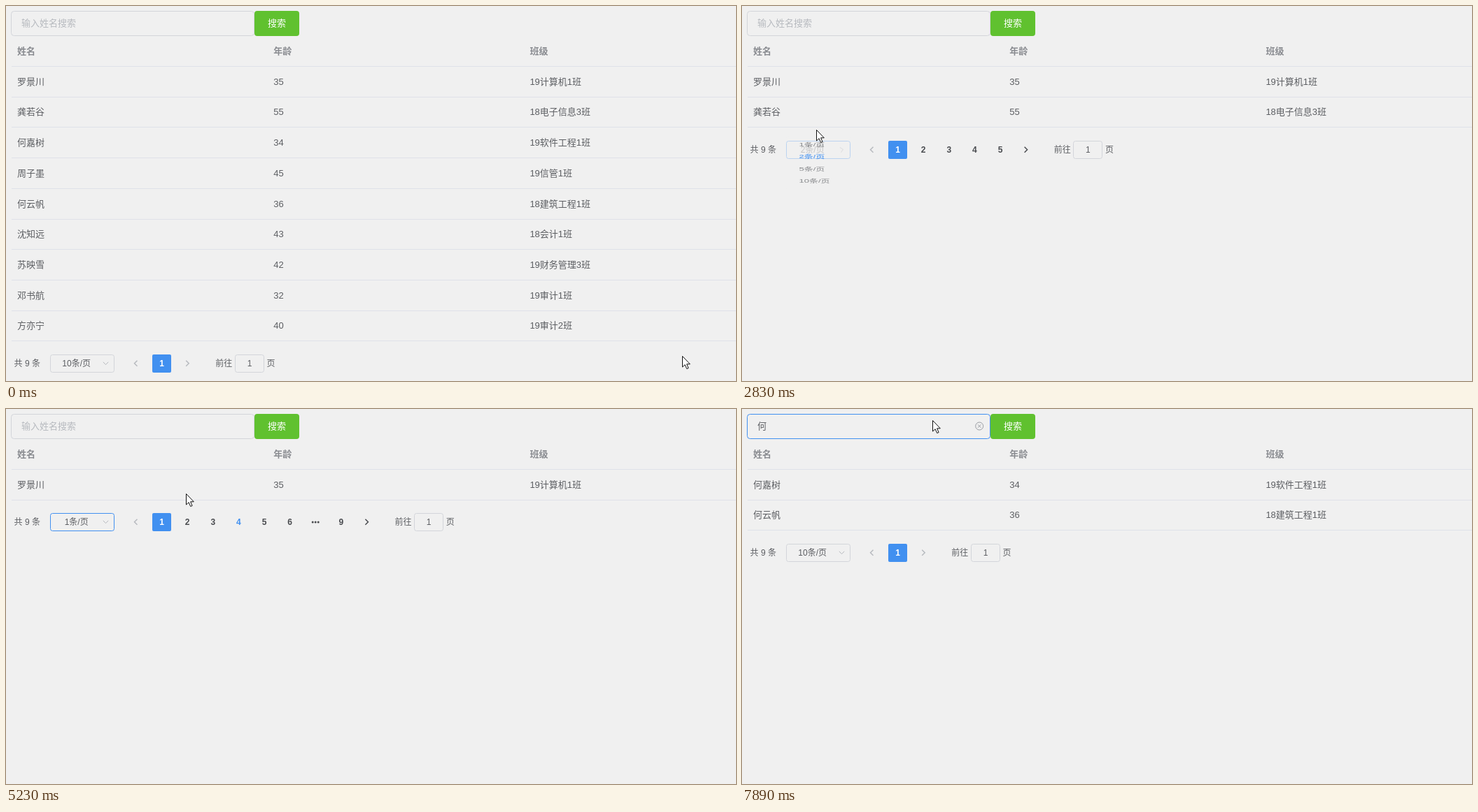
An HTML page for the animation above (7.99 s loop, 1043 by 537 pixels).

```html
<!DOCTYPE html>
<html lang="zh-CN">
<head>
<meta charset="utf-8">
<title>学生表分页</title>
<style>
html, body { margin: 0; width: 100%; height: 100%; overflow: hidden; background: #f0f0f0; }
svg { display: block; font: 13px "Liberation Sans", "Noto Sans CJK SC", "Noto Sans CJK", sans-serif; fill: #5c5e62; }
.small { font-size: 12px; }
.mid { text-anchor: middle; }
.bold { font-weight: 700; }
</style>
</head>
<body>
<svg id="stage" width="1043" height="537" viewBox="0 0 1043 537"></svg>
<script>
const stage = document.getElementById('stage');
const LOOP = 7990, STEP = 43.72, OPTION = 31, MENU_H = 137;
const BLUE = '#4190f0', BORDER = '#d3d5da', MUTED = '#b7babf', DARK = '#4a4c50', BG = '#f0f0f0';
const HOVER_INPUT = 6550, FOCUS_INPUT = 6650, TYPING = 6850, FILTER = 7510;

const people = [
  ['罗景川', 35, '19计算机1班'], ['龚若谷', 55, '18电子信息3班'], ['何嘉树', 34, '19软件工程1班'],
  ['周子墨', 45, '19信管1班'], ['何云帆', 36, '18建筑工程1班'], ['沈知远', 43, '18会计1班'],
  ['苏映雪', 42, '19财务管理3班'], ['邓书航', 32, '19审计1班'], ['方亦宁', 40, '19审计2班']
];
const sizes = [1, 2, 5, 10];
const keys = ['', 'h', 'he', '何'];

// what the user does: pointer moves, menu openings, picked sizes, clicked pages
const script = [
  [0, 'move', 966, 501], [800, 'move', 219, 27],
  [1330, 'open'], [1430, 'move', 94, 401], [1730, 'pick', 1], [2030, 'move', 108, 121],
  [2130, 'open'], [2790, 'pick', 2], [2830, 'move', 106, 177],
  [2980, 'open'], [3530, 'pick', 5], [3830, 'move', 79, 257],
  [4230, 'page', 2], [4430, 'open'], [4730, 'pick', 1], [5230, 'move', 257, 121],
  [5330, 'page', 4], [5530, 'open'], [6160, 'pick', 10], [6250, 'move', 96, 205],
  [HOVER_INPUT, 'move', 150, 27], [7890, 'move', 272, 16]
];

const pageX = i => 222.6 + 36.6 * i;
const pagerY = rows => Math.round(118.7 + STEP * rows);
const slice = s => people.slice((s.page - 1) * s.size, s.page * s.size);
const clamp = (v, hi) => Math.min(hi, Math.max(0, v));
const ease = u => 1 - (1 - clamp(u, 1)) ** 4;
const lastAt = (list, t) => list.findLastIndex(e => e.t <= t);

// play the script once to learn the pointer path and the table states
const path = [], states = [{ t: 0, size: 10, page: 1, menu: null }];
for (const [t, kind, a, b] of script) {
  const now = states[states.length - 1], y = pagerY(slice(now).length);
  let x = a, py = b;
  if (kind === 'open') {
    const up = y + 24 + MENU_H > 537;
    [x, py] = [110, y];
    states.push({ ...now, t, menu: { from: t + 100, open: true, up, top: up ? y - 162 : y + 24 } });
  } else if (kind === 'pick') {
    [x, py] = [95, now.menu.top + 22 + OPTION * sizes.indexOf(a)];
    states.push({ t, size: a, page: 1, menu: { ...now.menu, from: t, open: false } });
  } else if (kind === 'page') {
    [x, py] = [pageX(a - 1), y];
    states.push({ ...now, t, page: a });
  }
  path.push({ t, x, y: py });
}

// the picture advances in 100 ms ticks counted from these times
const anchors = [0, 1330, 6250, 7010, 7890];
function snap(t) {
  const a = anchors.findLast(v => v <= t);
  return a + Math.floor((t - a) / 100) * 100;
}

const text = (x, y, s, cls = '', fill = '') =>
  `<text x="${x}" y="${y}" class="${cls}"${fill && ` fill="${fill}"`}>${s}</text>`;
const box = (x, y, w, h, r, color) =>
  `<rect x="${x}" y="${y}" width="${w}" height="${h}" rx="${r}" fill="none" stroke="${color}"/>`;
const fillBox = (x, y, w, h, r, color) =>
  `<rect x="${x}" y="${y}" width="${w}" height="${h}" rx="${r}" fill="${color}"/>`;
const line = (d, color, width = 1, move = '') =>
  `<path d="${d}" fill="none" stroke="${color}" stroke-width="${width}" transform="${move}"/>`;

function pointer(t) {
  const i = lastAt(path, t), a = path[i], b = path[i + 1] || a;
  const u = b === a ? 0 : (t - a.t) / (b.t - a.t);
  const x = a.x + (b.x - a.x) * u + .5, y = a.y + (b.y - a.y) * u + .5;
  return `<path transform="translate(${x} ${y})" d="M0 0V15.5L3.6 12.2L6.2 18L8.6 17L6.1 11.3H10.8Z" fill="#fff" stroke="#111"/>`;
}

function searchBar(t) {
  const hover = t >= HOVER_INPUT || (t >= 800 && t < 1000);
  const query = keys[clamp(Math.floor((t - TYPING) / 100), keys.length - 1)];
  let s = box(7.5, 7.5, 347, 35, 4, t >= FOCUS_INPUT ? BLUE : hover ? '#b9bdc5' : BORDER);
  s += query ? text(22, 29, query) : text(22, 29, '输入姓名搜索', '', MUTED);
  if (query) s += '<circle cx="339.2" cy="24.5" r="5.5" fill="none" stroke="#999ca2"/>' +
    line('M337 22.3l4.4 4.4M341.4 22.3l-4.4 4.4', '#999ca2');
  return s + fillBox(355, 7, 64, 36, 4, '#60c12f') + text(387, 28.5, '搜索', 'mid', '#fff');
}

function table(rows) {
  const cells = (row, k, cls, fill) =>
    row.map((v, i) => text(16 + 366.2 * i, Math.round(69 + STEP * k), v, cls, fill)).join('');
  let s = cells(['姓名', '年龄', '班级'], 0, 'bold', '#898b90');
  for (let k = 0; k <= rows.length; k++) {
    s += line(`M8 ${Math.floor(86.4 + STEP * k) + .5}H1043`, '#dfe1e9');
    if (k) s += cells(rows[k - 1], k);
  }
  return s;
}

function menuPose(menu, t) {
  if (!menu) return { scale: 0, alpha: 0 };
  const p = ease((t - menu.from) / 300);
  return menu.open ? { scale: p, alpha: p } : { scale: 1 - p, alpha: Math.max(0, 1 - 1.6 * p * p) };
}

function menuList({ menu, size }, { scale, alpha }) {
  if (alpha < .1) return '';
  const origin = menu.up ? menu.top + MENU_H : menu.top;
  const items = sizes.map((n, i) => {
    const on = n === size;
    return text(81.5, menu.top + 26.6 + OPTION * i, n + '条/页', on ? 'bold' : '', on ? BLUE : '');
  }).join('');
  return `<g opacity="${alpha}" transform="translate(0 ${origin}) scale(1 ${scale}) translate(0 ${-origin})">` +
    fillBox(63, menu.top, 92, MENU_H, 4, BG) + items + '</g>';
}

function pager(t, y, { size, page, menu }, pose) {
  const base = y + 4, count = Math.ceil(people.length / size);
  const pages = count > 7 ? [1, 2, 3, 4, 5, 6, 0, count] : Array.from({ length: count }, (_, i) => i + 1);
  const focus = menu && t < FOCUS_INPUT;
  const hovered = t >= 5130 && t < 5330 ? 4 : -1;
  const arrow = (x, dir, on) =>
    line(`M${-2 * dir} -4L${2 * dir} 0L${-2 * dir} 4`, on ? DARK : MUTED, 1.5, `translate(${x} ${y - .3})`);

  let s = text(11.6, base, '共 9 条', 'small');
  s += box(63.5, y - 12.5, 91, 25, 3, focus ? BLUE : BORDER);
  s += text(100.7, base, size + '条/页', 'small mid');
  s += line('M-3.7 1.9L0 -1.9L3.7 1.9', MUTED, 1, `translate(142.5 ${y - .3}) rotate(${180 * (1 - pose.scale)})`);
  s += arrow(185.5, -1, page > 1);
  pages.forEach((n, i) => {
    const x = pageX(i), active = n === page;
    if (active) s += fillBox(Math.round(x - 13.6), y - 13, 27, 26, 2, BLUE);
    if (n) s += text(x, base, n, 'small mid bold', active ? '#fff' : n === hovered ? BLUE : DARK);
    else for (const d of [-4, 0, 4]) s += `<circle cx="${x + d}" cy="${y}" r="1.5" fill="${DARK}"/>`;
  });
  s += arrow(pageX(pages.length), 1, page < count);
  const x = pageX(pages.length - 1) + 76.7;
  s += text(x, base, '前往', 'small') + box(Math.floor(x + 28.2) + .5, y - 12.5, 41, 25, 3, BORDER);
  return s + text(x + 48.7, base, page, 'small mid') + text(x + 73.3, base, '页', 'small');
}

function draw(t) {
  const state = states[lastAt(states, t)], pose = menuPose(state.menu, t);
  const rows = t >= FILTER ? people.filter(p => p[0].startsWith('何')) : slice(state);
  stage.innerHTML = fillBox(0, 0, 1043, 537, 0, BG) + searchBar(t) + table(rows) +
    pager(t, pagerY(rows.length), state, pose) + menuList(state, pose) + pointer(t);
}

const start = performance.now();
let shown = -1;
function tick() {
  const t = snap((performance.now() - start) % LOOP);
  if (t !== shown) draw(shown = t);
  requestAnimationFrame(tick);
}
tick();
</script>
</body>
</html>
```
